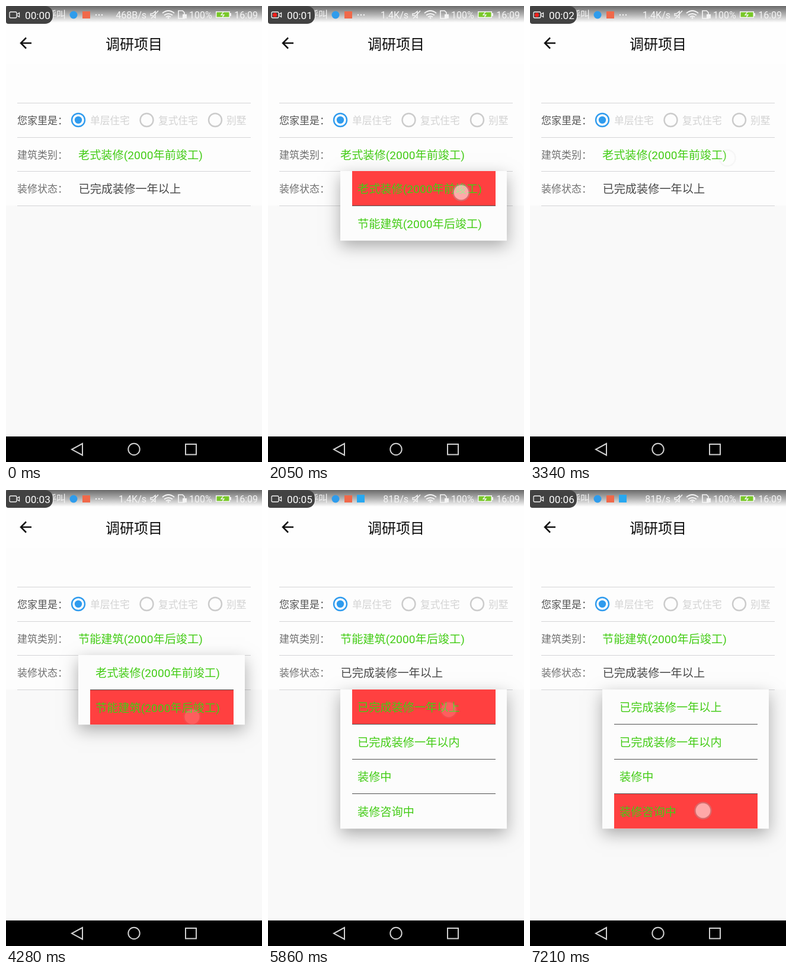
Write an HTML page with a canvas that moves like this. It is 432 by 768 pixels and loops after 7260 ms.

```html
<!DOCTYPE html>
<html lang="zh-CN">
<head>
<meta charset="utf-8">
<style>
  html, body { margin: 0; width: 100%; height: 100%; overflow: hidden; background: #f9f9f9; }
  canvas { display: block; }
</style>
</head>
<body>
<canvas id="stage" width="432" height="768"></canvas>
<script>
const ctx = document.getElementById('stage').getContext('2d');
const LOOP = 7260, OPEN = 260, CLOSE = 180, ITEM = 58.6;
const OPEN_LAG = 220, CLOSE_LAG = 160, TAP_FADE = 200;
const FONT = 'Roboto, "Noto Sans CJK SC", "Noto Sans CJK", sans-serif';
const GREEN = '#42cc14', PALE = '#d3d3d3', ICON = '#f4f4f4';

const BUILD = ['老式装修(2000年前竣工)', '节能建筑(2000年后竣工)'];
const STATE = ['已完成装修一年以上', '已完成装修一年以内', '装修中', '装修咨询中'];

const tap = (down, up, x, y) => ({ down, up, x, y });

// Each list is opened by one tap and closed by the next.
const popups = [
  { opener: tap(620, 720, 333, 256), chooser: tap(1960, 2090, 326, 314), top: 278, items: BUILD, pick: 0 },
  { opener: tap(3080, 3180, 333, 256), chooser: tap(4040, 4140, 314, 382), top: 278, items: BUILD, pick: 1 },
  { opener: tap(4780, 4880, 306, 312), chooser: tap(5620, 5720, 305, 370), top: 336, items: STATE, pick: 0 },
  { opener: tap(6280, 6380, 306, 312), chooser: tap(7130, 7300, 292, 540), top: 336, items: STATE, pick: 3 }
];
const taps = popups.flatMap(p => [p.opener, p.chooser]);

const clamp = v => Math.max(0, Math.min(1, v));
const ease = u => u < .5 ? 2 * u * u : 1 - 2 * (1 - u) ** 2;

function text(str, x, cy, size, color, align = 'left') {
  ctx.font = `${size}px ${FONT}`;
  ctx.textAlign = align;
  ctx.fillStyle = color;
  ctx.fillText(str, x, cy + size * .37);
}

function rect(x, y, w, h, color) {
  ctx.fillStyle = color;
  ctx.fillRect(x, y, w, h);
}

function disc(x, y, r, color) {
  ctx.fillStyle = color;
  ctx.beginPath();
  ctx.arc(x, y, r, 0, 7);
  ctx.fill();
}

function stroke(path, color, width) {
  ctx.strokeStyle = color;
  ctx.lineWidth = width;
  ctx.stroke(new Path2D(path));
}

function ring(x, y, r, color, width) {
  ctx.strokeStyle = color;
  ctx.lineWidth = width;
  ctx.beginPath();
  ctx.arc(x, y, r, 0, 7);
  ctx.stroke();
}

function drawStatus(t) {
  const shade = ctx.createLinearGradient(0, 0, 0, 28);
  shade.addColorStop(0, '#6a6a6a');
  shade.addColorStop(.5, '#b0b0b0');
  shade.addColorStop(1, '#fefefe');
  rect(0, 0, 432, 28, shade);

  text('呼叫', 69, 14, 16, ICON);
  disc(114, 15, 6.5, '#2f9cec');
  rect(129, 9, 13, 12, '#f0694a');
  if (t < 4800) for (const x of [152, 157, 162]) disc(x, 15, 1.2, ICON);
  else rect(150, 8, 13, 13, '#28a8f0');

  const speed = t < 1800 ? '468B/s' : t < 4800 ? '1.4K/s' : '81B/s';
  text(speed, 237, 15, 16, ICON, 'right');
  stroke('M244 13h3l5-4v11l-5-4h-3zM245 21l12-13', ICON, 1.4);
  stroke('M264 12q10-8 20 0M267 15.500q7-5 14 0M270 18.500q4-3 8 0', ICON, 2);
  disc(274, 20, 1.5, ICON);
  stroke('M291 8h7l3 3v10h-10z', ICON, 1.6);
  rect(298, 14, 7, 7, ICON);
  text('100%', 309, 15, 16, ICON);
  rect(354, 9, 24, 11, ICON);
  rect(378, 12, 2, 5, ICON);
  rect(355.5, 10.5, 21, 8, '#78c828');
  stroke('M367 10l-4 5h5l-3 4', ICON, 1.3);
  text('16:09', 425, 15, 16, ICON, 'right');

  // Recorder badge
  ctx.fillStyle = '#424242';
  ctx.beginPath();
  ctx.roundRect(0, 0, 79, 30, [4, 13, 13, 4]);
  ctx.fill();
  stroke('M8 10h8q2 0 2 2v6q0 2-2 2h-8q-2 0-2-2v-6q0-2 2-2zM18.500 14l4-2.500v7l-4-2.500', '#f4f4f4', 1.3);
  const blink = t % 600;
  if (blink > 130 && blink < 430) disc(11.5, 15, 3.6, '#f0201c');
  const sec = Math.max(0, Math.floor((t - 500) / 1000));
  text('00:0' + sec, 32, 15.5, 17.2, '#fff');
}

function drawPage(t) {
  rect(0, 0, 432, 768, '#f9f9f9');
  rect(0, 97, 432, 239, '#fdfdfd');
  rect(0, 0, 432, 97, '#fefefe');
  drawStatus(t);

  stroke('M43 62.500H26M34 53.500L25 62.500L34 71.500', '#111', 2.5);
  text('调研项目', 216, 64, 24, '#0c0c0c', 'center');

  for (const y of [163, 221, 278, 336]) rect(19, y, 394, 1, '#d4d4d6');
  text('您家里是：', 19, 193, 17, '#545454');
  text('建筑类别：', 19, 250.5, 17, '#707070');
  text('装修状态：', 19, 308, 17, '#707070');

  ring(122, 192, 11, '#2f9bee', 2.4);
  disc(122, 192, 6.2, '#2f9bee');
  ring(237.5, 192, 11, '#cbcbcb', 2.4);
  ring(353, 192, 11, '#cbcbcb', 2.4);
  text('单层住宅', 142, 193, 16.7, PALE);
  text('复式住宅', 257, 193, 16.7, PALE);
  text('别墅', 372, 193, 16.7, PALE);

  const chosen = t > popups[1].chooser.up + 40 ? 1 : 0;
  text(BUILD[chosen], 122, 250.5, 19.2, GREEN);
  text(STATE[0], 122.5, 308, 19.2, '#484848');

  rect(0, 725, 432, 43, '#000');
  const nav = '#d0d0d0';
  stroke('M129 737v19.500L111 746.800z', nav, 2);
  ring(216, 746.5, 9.7, nav, 2);
  stroke('M303 738h18v17.500h-18z', nav, 2);
}

// The list slides out of its row while the visible window grows.
function drawPopup({ opener, chooser, top, items, pick }, t) {
  const open = opener.up + OPEN_LAG, close = chooser.up + CLOSE_LAG;
  if (t < open || t > close + CLOSE) return;
  const u = clamp((t - open) / OPEN), e = ease(u), rest = 1 - e;
  const full = items.length * ITEM;
  const dy = -rest * (28 + full / 2);
  const h = 49 + (full - 49) * e;
  const x = 122 + 10 * rest;
  const y = top + full / 2 + dy + 9 * rest - h / 2;
  const tone = 234 + 18 * e;

  ctx.save();
  ctx.globalAlpha = Math.min(1, u * 2) * (1 - clamp((t - close) / CLOSE));
  ctx.shadowColor = `rgba(0,0,0,${.32 * e})`;
  ctx.shadowBlur = 26;
  ctx.shadowOffsetY = 9;
  rect(x, y, 281, h, `rgb(${tone},${tone},${tone})`);
  ctx.shadowColor = 'transparent';

  ctx.beginPath();
  ctx.rect(x, y, 281, h);
  ctx.clip();
  ctx.translate(x, top + dy);
  if (t > chooser.down + 20) rect(20, pick * ITEM, 242, ITEM, '#ff4040');
  items.forEach((label, i) => {
    if (i) rect(20, Math.floor(i * ITEM), 242, 1, '#505050');
    text(label, 29, i * ITEM + 30, 19.2, GREEN);
  });
  ctx.restore();
}

function drawTap({ down, up, x, y }, t) {
  if (t < down || t > up + TAP_FADE) return;
  ctx.globalAlpha = 1 - clamp((t - up) / TAP_FADE);
  disc(x, y, 12.5, 'rgba(255,255,255,.55)');
  ring(x, y, 13.5, 'rgba(165,165,165,.4)', 2.5);
  ctx.globalAlpha = 1;
}

function frame(now) {
  const t = now % LOOP;
  drawPage(t);
  popups.forEach(p => drawPopup(p, t));
  taps.forEach(p => drawTap(p, t));
  requestAnimationFrame(frame);
}
requestAnimationFrame(frame);
</script>
</body>
</html>
```
